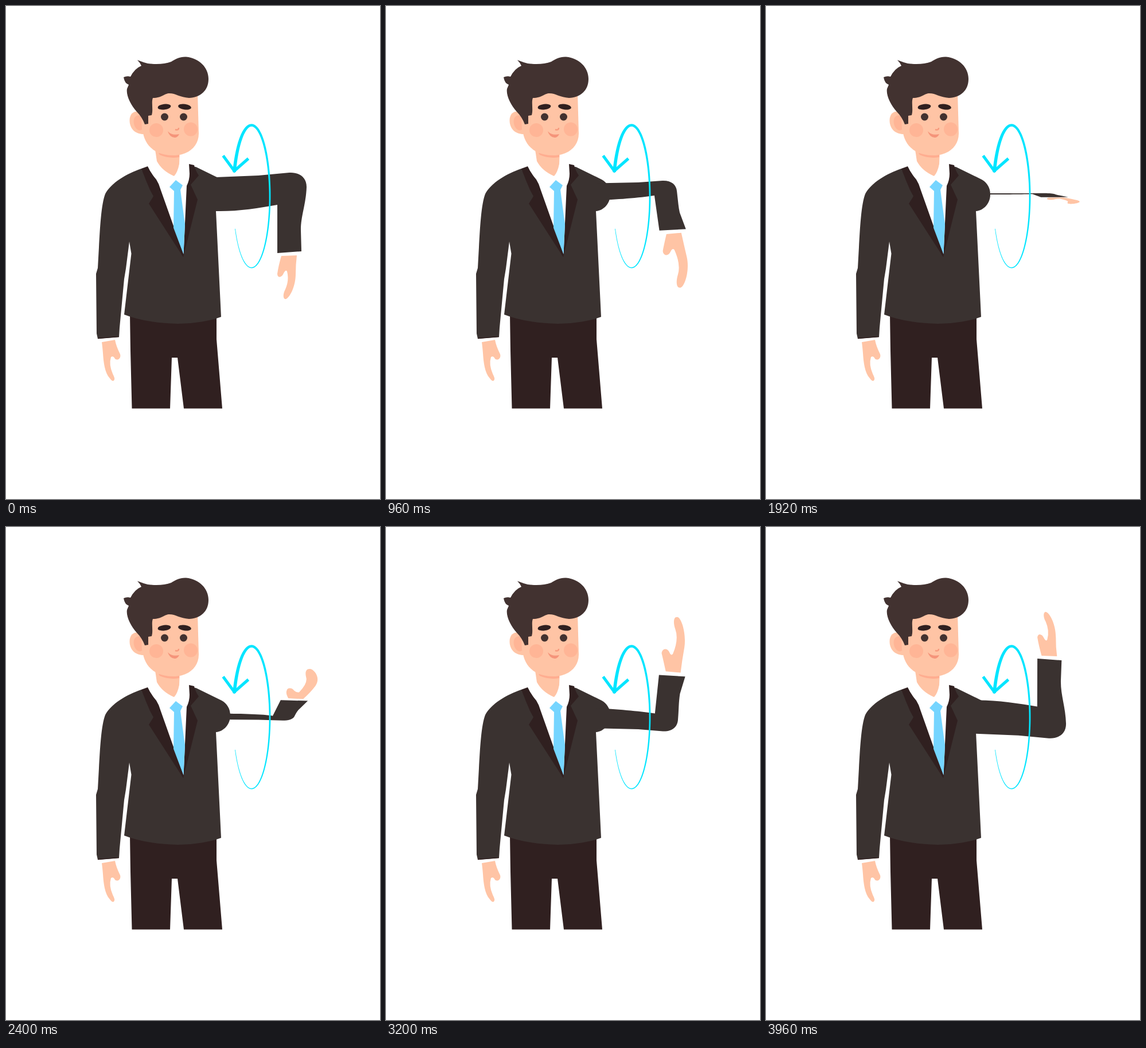
Write an HTML page that moves like this. It is 652 by 858 pixels and loops after 4000 ms.

```html
<!DOCTYPE html>
<html lang="en">
<head>
<meta charset="utf-8">
<title>Arm rotation</title>
<style>
  html, body { margin: 0; width: 100%; height: 100%; overflow: hidden; background: #fff; }
  svg { display: block; width: 100%; height: 100%; }
  .suit { fill: #3a3230; }
  .dark { fill: #302020; }
  .hair { fill: #423230; }
  .skin { fill: #ffc4a5; }
  .blush { fill: #ffb596; }
</style>
</head>
<body>
<svg viewBox="0 0 652 858">
  <!-- legs -->
  <path class="dark" d="M216 536L367 536L367 580L377 700.500L310 700.500L299 612L289 612L286 700.500L219.500 700.500L217 600Z"/>

  <!-- resting hand -->
  <path class="skin" d="M167 585L190 581Q192 592 199 606C201 613 195 618 190 614Q187 608 183 611Q179 624 186 640Q190 648 189 650Q187 656 181 648C172 638 170 620 169 604Q168 592 167 585Z"/>

  <!-- jacket -->
  <path class="suit" d="M236 283C210 292 183 308 173 327C166 345 164 385 162 420L160 456L157 466L158 570L160 579L197 576L198 560L206 475L209 457L215 410L218.500 431L206 537Q245 552 300 553Q345 552 375 541L366 357C380 356 391 343 391 328C391 316 385 307 376 302L331 280Z"/>
  <path d="M160 578.500L197 575.500" stroke="#302020" stroke-width="1.500"/>

  <!-- shirt, neck, lapels, tie -->
  <path fill="#fff" d="M246 279L262 267L303 270L320 275L320 303L309.500 432L266 320Z"/>
  <path class="skin" d="M260 250L303 250L302 275Q299 290 293 296Q272 287 263 270Z"/>
  <path fill="#ffad90" d="M266 256L302 256L302 263Q284 266 268 259Z"/>
  <path class="dark" d="M236 283L247 279Q252 290 262 302Q267 310 269 318L309.500 432L309 437L249 344L257 331L251 320Q243 302 236 283Z"/>
  <path class="dark" d="M319 275L328 277Q331 288 336 295L322 311L334 337L309 437L309.500 432L315 313Q320 303 320 292Z"/>
  <path fill="#75d5ff" d="M296 303L285 315L293 322L292 386L309.500 432L312 380L304 320L308 312Z"/>

  <!-- head -->
  <path class="skin" d="M240 190C232 179 215.500 182 215.500 199C215.500 214 226 224 242 223Z"/>
  <path class="blush" d="M236 192C226 187 221 196 223 205C225 214 232 219 237 215Z"/>
  <path class="skin" d="M236 160L250 140L334 150L336 222C336 244 318 260 292 260C262 260 241 245 238 215Z"/>
  <circle class="blush" cx="262" cy="216" r="12"/>
  <circle class="blush" cx="322" cy="214.500" r="12"/>
  <circle class="hair" cx="276.500" cy="193" r="6.500"/>
  <circle class="hair" cx="309.500" cy="193" r="6.500"/>
  <ellipse class="dark" rx="11.500" ry="4.800" transform="translate(276 175.500) rotate(-7)"/>
  <ellipse class="dark" rx="11.500" ry="4.800" transform="translate(311.500 175.500) rotate(8)"/>
  <path d="M301 212Q301 217 295 215" fill="none" stroke="#f79a7e" stroke-width="2.500"/>
  <path fill="#f5947a" d="M282 218Q289 226 302 223Q299 229 294 229Q285 228 282 218Z"/>
  <path class="hair" d="M248 205L242 206Q237 193 228 184C217 172 209 155 211 144L214 137Q207 135 205 124Q211 121 217 123Q224 109 236 104Q234 99 229 94Q239 98 247 100C263 102 277 101 288 97C296 92 303 88 314 88.500C337 91 353 107 353 127C353 148 338 159 319 160C303 159 296 152 285 152C276 152 272 160 256 160C253 168 257 180 254 190L248 191Z"/>

  <!-- swinging arm -->
  <path class="skin" id="hand"/>
  <path class="suit" id="sleeve"/>

  <!-- direction arrow -->
  <path id="ring" fill="#00e5ff"/>
  <path d="M378.500 260.500L398 287L422.500 265.500" fill="none" stroke="#00e5ff" stroke-width="5"/>
</svg>
<script>
const LOOP = 4000, STEP = 40;
const $ = id => document.getElementById(id);
const axis = (s, c) => 329 - c - 1.5 * s;

// Depth (sine of the swing angle) at which each pose is drawn
const DEPTHS = [0, 0.454, 0.861];

const sleevePoses = [
  'M366 298L440 295L494 290C510 289 524 297 524 315C523 345 514 365 514 390L515 427L473 430L473 346C440 352 400 358 366 357Z',
  'M366 303L440 301L484 297C502 296 512 306 512 321C513 340 511 355 513 374L520 405L475 408L470 335C440 339 400 343 366 345Z',
  'M366 315L440 314L482 312C494 312 502 316 504 324C506 331 508 340 511 346L525 369L478 371L466 327C445 331 400 333 366 333Z'
];
const handPoses = [
  'M480 435Q475 452 473 466C473 474 481 473 484 465Q488 458 490 462Q494 477 487 493C482 502 483 511 488 510C495 507 505 488 505 466Q505 450 507 434Z',
  'M486 414Q481 438 478 447C479 456 488 456 491 450Q494 442 497 447Q506 470 499 487C494 499 496 508 502 506C509 504 517 478 515 455Q512 432 512 412Z',
  'M491 376Q486 391 487 398C488 406 497 405 500 398Q504 392 508 394Q522 417 518 432C515 445 517 454 524 453C531 452 542 430 534 409Q527 392 517 374Z'
];

// Flatten each pose: heights are stored relative to the axis, undoing the foreshortening
function unfold(poses) {
  return poses.map((d, i) => {
    const s = DEPTHS[i], c = Math.sqrt(1 - s * s);
    return d.match(/\d+/g).map((n, k) => k % 2 ? (n - axis(s, c)) / c : +n);
  });
}

function limb(id, poses) {
  const el = $(id), flat = unfold(poses);
  return (s, c) => {
    const w = DEPTHS.map((a, i) => DEPTHS.reduce(
      (p, b, j) => i === j ? p : p * (s - b) / (a - b), 1));
    let k = 0;
    el.setAttribute('d', poses[0].replace(/\d+/g, () => {
      const v = w.reduce((sum, wi, i) => sum + wi * flat[i][k], 0);
      return (k++ % 2 ? axis(s, c) + v * c : v).toFixed(2);
    }));
  };
}

// Ellipse stroke that thickens toward the arrow head
function drawRing() {
  const outer = [], inner = [], n = 120;
  for (let i = 0; i <= n; i++) {
    const u = i / n, a = (153 - 313 * u) * Math.PI / 180;
    const h = 0.4 + 2.5 * u ** 1.3;
    const x = Math.cos(a), y = Math.sin(a);
    const nx = x * 124, ny = y * 32, len = Math.hypot(nx, ny);
    const at = k => `${(428 + 32 * x + k * nx / len).toFixed(2)} ${(331.5 + 124 * y + k * ny / len).toFixed(2)}`;
    outer.push(at(h));
    inner.unshift(at(-h));
  }
  $('ring').setAttribute('d', `M${outer.concat(inner).join('L')}Z`);
}

const limbs = [limb('sleeve', sleevePoses), limb('hand', handPoses)];

function render(ms) {
  const t = Math.floor((ms % LOOP) / STEP) * STEP;
  const a = Math.PI * t / LOOP;
  limbs.forEach(draw => draw(Math.sin(a), Math.cos(a)));
}

drawRing();
const start = performance.now();
function tick() {
  render(performance.now() - start);
  requestAnimationFrame(tick);
}
tick();
</script>
</body>
</html>
```
